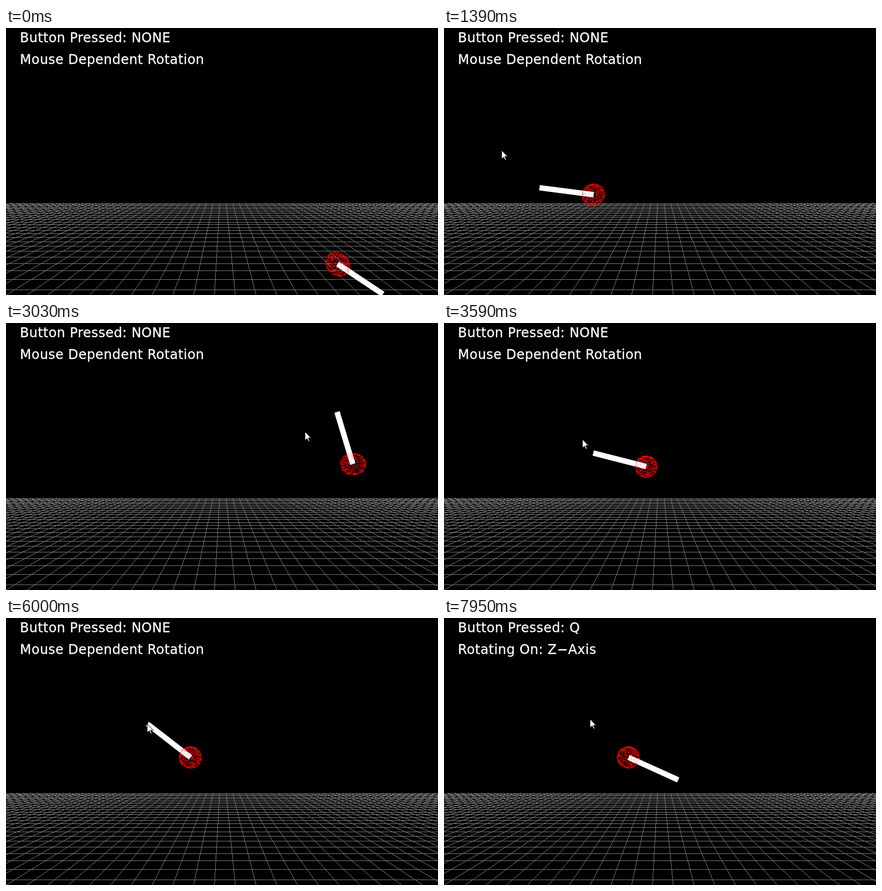
An HTML page with a canvas for the animation above (8 s loop, 791 by 490 pixels).

```html
<!DOCTYPE html>
<html lang="en">
<head>
<meta charset="utf-8">
<title>Arm follows the mouse</title>
<style>
  html, body { margin: 0; width: 100%; height: 100%; overflow: hidden; background: #000; }
  canvas, svg { position: absolute; left: 0; top: 0; display: block; }
  text {
    font: 24px "DejaVu Sans", sans-serif; letter-spacing: .45px;
    fill: #fff; stroke: #fff; stroke-width: .3px;
  }
</style>
</head>
<body>
<canvas id="stage" width="791" height="490"></canvas>
<svg width="791" height="490">
  <text id="button" x="25.6" y="26">Button Pressed: NONE</text>
  <text id="mode" x="25.6" y="66">Mouse Dependent Rotation</text>
</svg>
<script>
const W = 791, H = 490, CX = W / 2, CY = H / 2;
const EYE = CY / Math.tan(Math.PI / 6);
const LOOP = 8000, START = 300, STEP = 78.2;
const ARM = 100, RADIUS = 20, LAG = 2;
const CELL = 40, FLOOR_Y = 257, FLOOR_X = 381;
const SWING = 70, REST = 76, SPIN = 88;
const ctx = document.getElementById('stage').getContext('2d');
const button = document.getElementById('button');
const mode = document.getElementById('mode');

// Key poses: step, base x, base y, arm angle in degrees
const keys = [
  [-1, 607, 433, 33.7], [4, 560, 400, -60], [8, 455, 325, -146],
  [14, 274, 306, -172.6], [16, 195, 268, -154], [18, 172, 243, -118],
  [20, 180, 227, -60], [26, 382, 212.5, 19.2], [28, 452, 242, 23.4],
  [31, 612, 264, -8], [35, 635, 259, -106.8], [37, 630, 255, -146],
  [40, 480, 278, -194], [43, 345, 258, -155], [52, 337.8, 255.8, -149.2]
];
const last = keys.length - 1;

const rise = (i, c) => (keys[i + 1][c] - keys[i][c]) / (keys[i + 1][0] - keys[i][0]);

// Monotone slope: flat at ends and turning points
function slope(i, c) {
  if (i === 0 || i === last) return 0;
  const a = rise(i - 1, c), b = rise(i, c);
  return a * b <= 0 ? 0 : 2 * a * b / (a + b);
}

function track(k, c) {
  if (k >= keys[last][0]) return keys[last][c];
  const i = keys.findIndex(key => key[0] > k) - 1;
  const d = keys[i + 1][0] - keys[i][0], u = (k - keys[i][0]) / d, v = 1 - u;
  return v * v * (1 + 2 * u) * keys[i][c] + u * u * (3 - 2 * u) * keys[i + 1][c]
    + d * u * v * (v * slope(i, c) - u * slope(i + 1, c));
}

function angle(k) {
  if (k >= SPIN) return -124 + (k - SPIN) * 14.84;
  const u = Math.min(1, Math.max(0, (k - SWING) / (REST - SWING)));
  return track(k, 3) + 14.2 * u * u * (3 - 2 * u);
}

function pose(k) {
  const x = track(k, 1), y = track(k, 2), a = angle(k) * Math.PI / 180;
  return { x, y, tipX: x + ARM * Math.cos(a), tipY: y + ARM * Math.sin(a) };
}

// Hard-edged line, one pixel at a time
function pixelLine(g, x1, y1, x2, y2) {
  const n = Math.ceil(Math.max(Math.abs(x2 - x1), Math.abs(y2 - y1)));
  for (let i = 0; i <= n; i++) {
    g.fillRect(Math.floor(x1 + (x2 - x1) * i / n), Math.floor(y1 + (y2 - y1) * i / n), 1, 1);
  }
}

function makeFloor() {
  const floor = document.createElement('canvas');
  floor.width = W;
  floor.height = H;
  const g = floor.getContext('2d');
  g.fillRect(0, 0, W, H);
  g.fillStyle = '#787878';
  const scale = z => EYE / (EYE + z);
  const rows = 25, far = scale(rows * CELL), near = CY / FLOOR_Y;
  for (let i = 1; i <= rows; i++) {
    g.fillRect(0, Math.round(CY + FLOOR_Y * scale(i * CELL)), W, 1);
  }
  for (let i = -34; i <= 35; i++) {
    const x = FLOOR_X + i * CELL - CX;
    pixelLine(g, CX + x * far, CY + FLOOR_Y * far, CX + x * near, H);
  }
  return floor;
}

function makeDots(count) {
  let seed = 7;
  const random = () => (seed = seed * 16807 % 2147483647) / 2147483647;
  return Array.from({ length: count }, () => {
    const z = random() * 2 - 1, a = random() * Math.PI * 2, r = Math.sqrt(1 - z * z);
    return [r * Math.cos(a), r * Math.sin(a), z];
  });
}

const floor = makeFloor();
const dots = makeDots(1000);
const frontDots = dots.filter(d => d[2] > 0);

function drawDots(list, p) {
  ctx.fillStyle = '#f00';
  for (const [x, y, z] of list) {
    const s = EYE / (EYE - RADIUS * z);
    ctx.fillRect(Math.floor(CX + (p.x - CX + RADIUS * x) * s),
                 Math.floor(CY + (p.y - CY + RADIUS * y) * s), 1, 1);
  }
}

function drawArm(p) {
  ctx.strokeStyle = '#fff';
  ctx.lineWidth = 10;
  ctx.beginPath();
  ctx.moveTo(p.x, p.y);
  ctx.lineTo(p.tipX, p.tipY);
  ctx.stroke();
}

const arrow = new Path2D('M.5 .5V16.5L4.2 13 7 18.6 9 17.7 6.5 12H11.5Z');

function drawCursor(x, y) {
  ctx.save();
  ctx.translate(Math.floor(x), Math.floor(y));
  ctx.lineWidth = 1;
  ctx.fillStyle = '#fff';
  ctx.strokeStyle = '#000';
  ctx.fill(arrow);
  ctx.stroke(arrow);
  ctx.restore();
}

function drawClick(x, y) {
  ctx.strokeStyle = '#fff';
  ctx.lineWidth = 1;
  ctx.beginPath();
  ctx.arc(x, y, 11, 0, Math.PI * 2);
  ctx.stroke();
}

function setText(el, value) {
  if (el.textContent !== value) el.textContent = value;
}

function draw(t) {
  const k = t < START ? -1 : Math.floor((t - START) / STEP + .2);
  const p = pose(k), spinning = k >= SPIN;
  ctx.drawImage(floor, 0, 0);
  drawDots(dots, p);
  drawArm(p);
  ctx.globalAlpha = .3;
  drawDots(frontDots, p);
  ctx.globalAlpha = 1;
  if (k >= 0) {
    // The pointer runs ahead of the arm while it moves fast
    const m = pose(Math.min(k < 44 ? k + LAG : k, REST));
    if (t >= 6640 && t < 6710) drawClick(m.tipX, m.tipY);
    drawCursor(m.tipX, m.tipY);
  }
  setText(button, 'Button Pressed: ' + (spinning ? 'Q' : 'NONE'));
  setText(mode, spinning ? 'Rotating On: Z\u2212Axis' : 'Mouse Dependent Rotation');
}

const begin = performance.now();
function tick() {
  draw((performance.now() - begin) % LOOP);
  requestAnimationFrame(tick);
}
tick();
</script>
</body>
</html>
```
